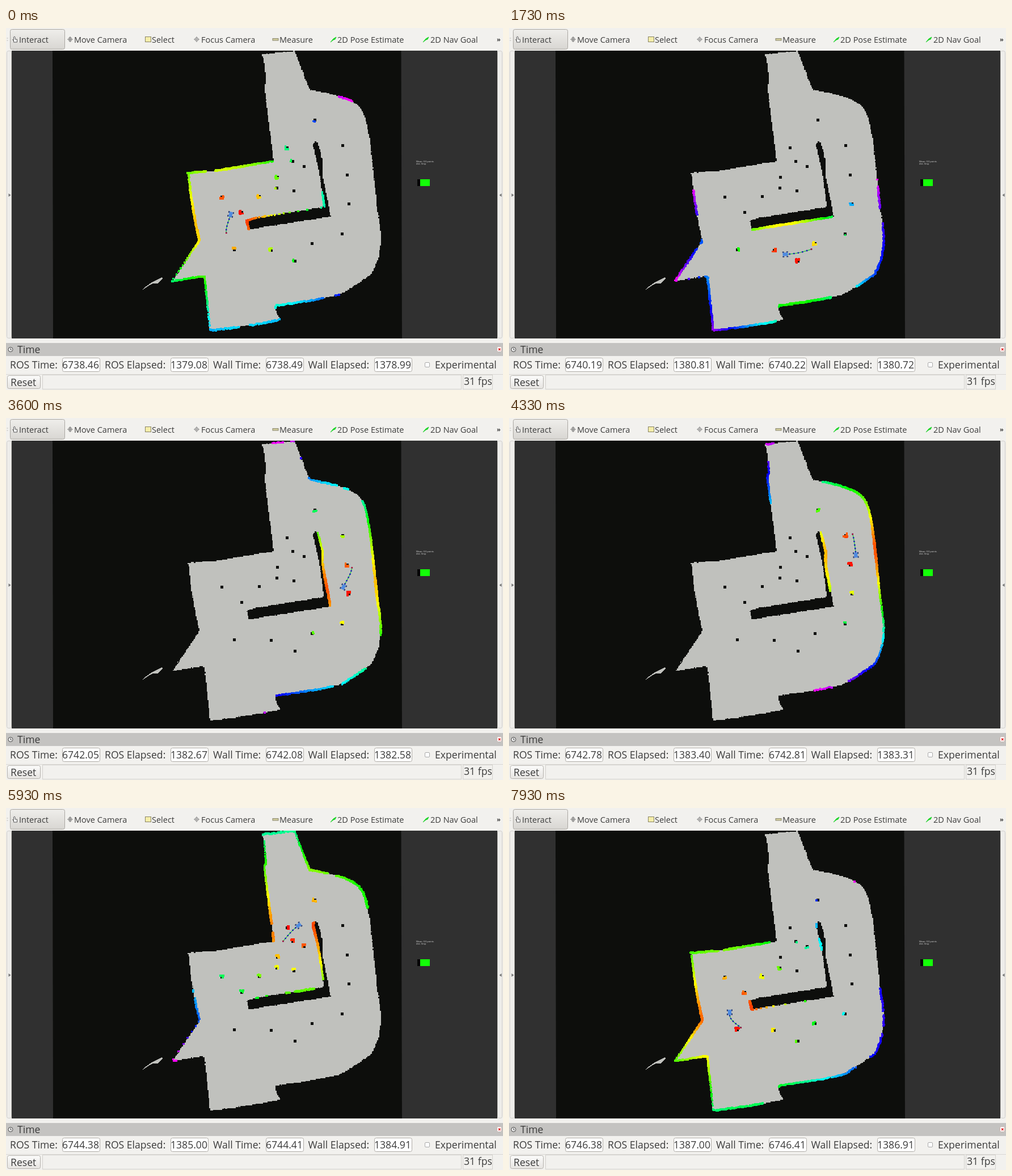
An HTML page for the animation above (8000 ms loop, 876x639 px).

```html
<!DOCTYPE html>
<html lang="en">
<head>
<meta charset="utf-8">
<title>Laser scan viewer</title>
<style>
html, body { margin: 0; width: 100%; height: 100%; overflow: hidden; background: #f2f1ee; }
svg { display: block; width: 876px; height: 639px; }
text { font-family: "Open Sans", "Noto Sans", sans-serif; font-size: 17.6px; fill: #3c3c3c; white-space: pre; }
.tool text { font-size: 14.5px; }
.crisp { shape-rendering: crispEdges; }
</style>
</head>
<body>
<svg viewBox="0 0 876 639">
  <defs>
    <linearGradient id="btn" x2="0" y2="1"><stop stop-color="#efeeeb"/><stop offset="1" stop-color="#d8d6d2"/></linearGradient>
    <linearGradient id="raised" x2="0" y2="1"><stop stop-color="#fcfcfb"/><stop offset="1" stop-color="#e6e4e1"/></linearGradient>
    <clipPath id="view"><rect x="10" y="40" width="856" height="508"/></clipPath>
  </defs>
  <rect width="876" height="639" fill="#f2f1ee"/>

  <g class="tool">
    <rect x="7.5" y="2.5" width="96" height="35" rx="3" fill="url(#btn)" stroke="#aaa7a2"/>
    <path d="M2.5 17v8" stroke="#d6d4d0" stroke-width="2" stroke-dasharray="2"/>
    <path d="M13.5 25v-9q1.5-2 2.5 0v4h3.5v5zM13 22l-2-2" fill="#fff" stroke="#555"/>
    <path d="M113 15v10M108 20h10M111 17h4v6h-4z" fill="none" stroke="#777"/>
    <rect x="245.5" y="15.5" width="10" height="9" fill="#f6eeaa" stroke="#8a8566"/>
    <path d="M336 15v10M331 20h10" stroke="#888"/><circle cx="336" cy="20" r="3" fill="none" stroke="#888"/>
    <rect x="470" y="18.5" width="10" height="3.5" fill="#d2cd9c" stroke="#8a8770"/>
    <path id="arrow" d="M572 25l5-6 5-3-2 4-3 1z" fill="#1ee02a" stroke="#1ed02a"/>
    <use href="#arrow" x="163"/>
    <text x="23" y="25.5">Interact</text>
    <text x="120" y="25.5">Move Camera</text>
    <text x="257" y="25.5">Select</text>
    <text x="344" y="25.5">Focus Camera</text>
    <text x="482" y="25.5">Measure</text>
    <text x="584" y="25.5">2D Pose Estimate</text>
    <text x="748" y="25.5">2D Nav Goal</text>
    <text x="865" y="23.5" font-weight="bold" style="font-size:11px">»</text>
  </g>

  <rect x="1.5" y="40.5" width="8" height="507" rx="3" fill="#eeedea" stroke="#cfcdc9"/>
  <rect x="866.5" y="40.5" width="8" height="507" rx="3" fill="#eeedea" stroke="#cfcdc9"/>
  <path d="M4.5 292l4 3-4 3zM873.5 292l-4 3 4 3z" fill="#777"/>

  <g clip-path="url(#view)">
    <rect x="10" y="40" width="856" height="508" fill="#303030"/>
    <path d="M82 40H696.5L698 548H83z" fill="#0d0e0c"/>
    <g id="map" class="crisp" fill="#c0c1bd">
      <path d="M238 464l9-8 10-7 18-9 1 2-8 9h-9l-6 3z"/>
    </g>
    <g id="scan" class="crisp"></g>
    <path id="plan" fill="none" stroke="#20c840" stroke-width="1.3"/>
    <path id="poses" fill="#1414b8"/>
    <rect id="goal" width="2.5" height="2.5" fill="#b01030"/>
    <g id="robot">
      <path d="M-5-5h3v2h-3zM2-5h3v2h-3zM-5 3h3v2h-3zM2 3h3v2h-3z" fill="#26366a"/>
      <rect x="-4.5" y="-3" width="9" height="6" fill="#4f8ae0"/>
    </g>
    <rect x="725" y="267" width="5" height="12" fill="#050505"/>
    <rect x="730" y="267" width="17" height="12" fill="#14ff08"/>
    <text x="723" y="236.5" style="font-size:4px;fill:#ddd">Mean: 0.0 points</text>
    <text x="723" y="240.5" style="font-size:4px;fill:#ddd">dist: 0mp</text>
  </g>

  <rect y="556" width="876" height="23" fill="#c4c3c1"/>
  <circle cx="8" cy="567.5" r="4" fill="#eee" stroke="#444"/><path d="M8 565v3h2" fill="none" stroke="#444"/>
  <text x="20" y="574">Time</text>
  <rect x="865.5" y="562.5" width="8" height="9" rx="2" fill="#fff" stroke="#c9b5b0"/>
  <path d="M868 565.5l3.5 3.5m0-3.5l-3.5 3.5" stroke="#e02020" stroke-width="1.4"/>
  <text x="7" y="601">ROS Time:</text>
  <text x="174" y="601">ROS Elapsed:</text>
  <text x="365" y="601">Wall Time:</text>
  <text x="532.5" y="601">Wall Elapsed:</text>
  <g id="fields"></g>
  <rect x="738.5" y="590.5" width="8" height="8" rx="1.5" fill="#fff" stroke="#aaa"/>
  <text x="756" y="601">Experimental</text>

  <path d="M0 611.5h876" stroke="#d9d7d3"/>
  <rect x="2.5" y="613.5" width="58" height="23" rx="3" fill="url(#raised)" stroke="#b5b2ad"/>
  <text x="8" y="631.5">Reset</text>
  <rect x="64.5" y="612.5" width="738" height="25" fill="none" stroke="#d3d1cd"/>
  <rect x="805.5" y="612.5" width="52" height="25" fill="none" stroke="#d3d1cd"/>
  <text x="807" y="629.5">31 fps</text>
</svg>
<script>
const LOOP = 8000, FPS = 15, RAYS = 720, HUES = 60, CELL = 1.6, DOT = 3.6;
const LEAD = 5;       // laser sits ahead of the robot's centre
const STEP = 0.5;     // seconds between waypoints
const BLOCK = '#0d0e0c';
const $ = id => document.getElementById(id);
const make = (tag, attrs) => {
  const el = document.createElementNS('http://www.w3.org/2000/svg', tag);
  for (const k in attrs) el.setAttribute(k, attrs[k]);
  return el;
};
const add = (parent, tag, attrs) => parent.appendChild(make(tag, attrs));
const pairs = s => s.split(' ').map(p => p.split(',').map(Number));
const rand = n => { const v = Math.sin(n * 12.9898) * 43758.5453; return v - Math.floor(v); };

const room = 'M451 47L508 40 535 109C565 115 612 122 627 145C640 165 645 230 654 318C662 365 666 392 645 434L628 446 591 470Q558 479 475 490V498L483 515Q430 526 360 534L350 440 346 438 292 447 305 428 341 375Q326 310 322 258L318 256 370 252 472 235 455 102 458 98 455 55z';
const wall = 'M541 206L543 201H549L558 235V260L572 333 428 356 424 340 440 335 561 316 551 248z';
const pillars = pairs('544,162 593,207 495,211 505,235 525,244 601,259 478,263 477,282 507,287 446,297 380,298 604,310 415,325 592,363 539,380 402,391 467,392 509,411');
const pillar = ([x, y]) => `M${x - 2.5} ${y - 2.5}h5v5h-5z`;

function trace(d, step) {
  const path = make('path', { d }), len = path.getTotalLength(), n = Math.ceil(len / step);
  return Array.from({ length: n }, (_, i) => {
    const p = path.getPointAtLength(i * len / n);
    return [p.x, p.y];
  });
}

// Ragged grid-cell version of an outline
function stairs(d) {
  const snap = v => (Math.round(v / CELL) * CELL).toFixed(1);
  return trace(d, CELL).map(([x, y], i) => {
    const j = rand(i >> 1) - .5, px = snap(x + j), py = snap(y + j);
    return i ? `H${px}V${py}` : `M${px} ${py}`;
  }).join('') + 'z';
}
const map = $('map');
add(map, 'path', { d: stairs(room) });
add(map, 'path', { d: 'M293 442l5-4 4-5 3-2M295 437l6-1', stroke: BLOCK, 'stroke-width': 1.5, fill: 'none' });
add(map, 'path', { d: stairs(wall) + pillars.map(pillar).join(''), fill: BLOCK });

const outlines = [[room, 4], [wall, 4], ...pillars.map(p => [pillar(p), 5])];
const segs = outlines.flatMap(([d, step]) => {
  const pts = trace(d, step);
  return pts.map(([x, y], i) => {
    const [u, v] = pts[(i + 1) % pts.length];
    return [x, y, u - x, v - y];
  });
});

// Waypoints, evenly spaced in time
const route = pairs('396,329 389,365 420,388 464,399 514,396 563,376 590,343 592,306 609,268 610,229 597,191 551,187 511,211 481,243 443,279 404,318 389,366 412,392 392,398');
function at(t) {
  const i = Math.floor(t / STEP), s = t / STEP - i;
  const p = k => route[Math.max(0, Math.min(route.length - 1, i + k))];
  return [0, 1].map(c => {
    const a = p(-1)[c], b = p(0)[c], d = p(1)[c], e = p(2)[c];
    return b + s / 2 * (d - a + s * (2 * a - 5 * b + 4 * d - e + s * (3 * (b - d) + e - a)));
  });
}

function cast(px, py, cx, cy) {
  let best = Infinity;
  for (const [x, y, dx, dy] of segs) {
    const den = cx * dy - cy * dx;
    if (!den) continue;
    const t = ((x - px) * dy - (y - py) * dx) / den;
    if (t < 2 || t >= best) continue;
    const u = ((x - px) * cy - (y - py) * cx) / den;
    if (u >= 0 && u <= 1) best = t;
  }
  return best;
}

const inks = Array.from({ length: HUES + 1 }, (_, i) =>
  add($('scan'), 'path', { fill: `hsl(${300 * i / HUES},100%,50%)` }));

// Hue runs from red at the nearest hit to magenta at the farthest
function drawScan(x, y, tick) {
  const hits = [];
  for (let i = 0; i < RAYS; i++) {
    const a = i / RAYS * 2 * Math.PI, cx = Math.cos(a), cy = Math.sin(a);
    const d = cast(x, y, cx, cy) + (rand(i + tick * 1.37) - .5) * 2;
    if (d < 400) hits.push([d, x + d * cx - DOT / 2, y + d * cy - DOT / 2]);
  }
  const ds = hits.map(h => h[0]), lo = Math.min(...ds), hi = Math.max(...ds);
  const paths = inks.map(() => '');
  for (const [d, u, v] of hits)
    paths[Math.round((d - lo) / (hi - lo) * HUES)] += `M${u.toFixed(1)} ${v.toFixed(1)}h${DOT}v${DOT}h-${DOT}z`;
  inks.forEach((el, i) => el.setAttribute('d', paths[i]));
}

function drawRobot(t, x, y, turn) {
  const ahead = Array.from({ length: 13 }, (_, i) => at(t + i * .0375));
  const [gx, gy] = ahead[12];
  $('plan').setAttribute('d', 'M' + ahead.join('L'));
  $('poses').setAttribute('d', ahead.filter((p, i) => i && i % 2 == 0)
    .map(([u, v]) => `M${u - 1.2} ${v - 1.2}h2.4v2.4h-2.4z`).join(''));
  $('goal').setAttribute('x', gx - 1.2);
  $('goal').setAttribute('y', gy - 1.2);
  $('robot').setAttribute('transform', `translate(${x} ${y}) rotate(${turn * 180 / Math.PI})`);
}

// Readings start at these hundredths of a second
const fields = pairs('99,673846 290,137908 458,673849 649,137899').map(([x, base]) => {
  add($('fields'), 'rect', { x: x + .5, y: 582.5, width: 66, height: 24, rx: 3, fill: '#fff', stroke: '#aeaba6' });
  return { base, text: add($('fields'), 'text', { x: x + 65, y: 601, 'text-anchor': 'end' }) };
});
function drawClocks(t) {
  const run = Math.floor(t * 99.85);
  for (const f of fields) f.text.textContent = ((f.base + run) / 100).toFixed(2);
}

let shown = -1;
function render(ms) {
  let tick = Math.round(ms * FPS / 1000);
  if (Math.round(tick * 100 / FPS) * 10 > ms) tick--;
  tick = Math.min(tick, LOOP * FPS / 1000 - 1);
  if (tick === shown) return;
  shown = tick;
  const t = tick / FPS, [x, y] = at(t), [nx, ny] = at(t + .06);
  const turn = Math.atan2(ny - y, nx - x);
  drawScan(x + LEAD * Math.cos(turn), y + LEAD * Math.sin(turn), tick);
  drawRobot(t, x, y, turn);
  drawClocks(t);
}
const start = performance.now();
function frame() {
  render((performance.now() - start) % LOOP);
  requestAnimationFrame(frame);
}
frame();
</script>
</body>
</html>
```
